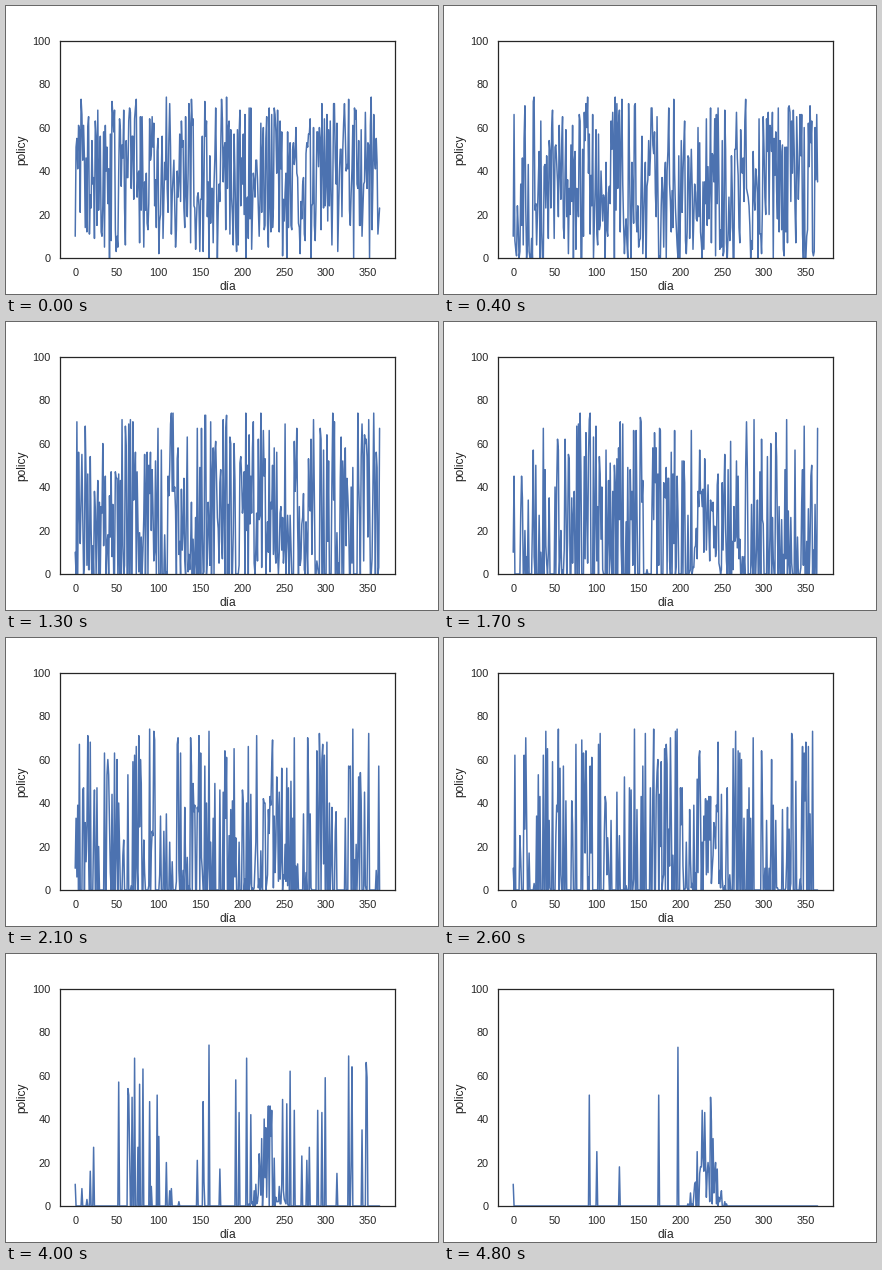
These frames come from a looping animation (432x288 px, 4.9 s). A matplotlib script:

```python
import numpy as np
import matplotlib.pyplot as plt
from matplotlib.animation import FuncAnimation

FRAMES, INTERVAL = 49, 100
DAYS = np.arange(365)
INK = "0.15"
MAX_ACTION = 75
EPS_MIN = 0.022

plt.rcParams.update({
    "font.family": "Liberation Sans",
    "text.kerning_factor": 6,
    "axes.labelcolor": INK,
    "axes.edgecolor": INK,
    "axes.linewidth": 1.25,
    "axes.labelsize": 12,
    "xtick.labelsize": 11,
    "ytick.labelsize": 11,
    "xtick.color": INK,
    "ytick.color": INK,
    "lines.solid_capstyle": "round",
})


def exploration(i):
    """Share of random choices, fading from every day to almost none."""
    return EPS_MIN + (1 - EPS_MIN) * (1 - i / (FRAMES - 1)) ** 1.3


def policy(i):
    """Epsilon-greedy choice per day; the learned part is one short season."""
    rng = np.random.default_rng(700 + i)
    season = 55 * np.exp(-((DAYS - 231) / 13) ** 2)
    learned = (season * rng.random(DAYS.size) ** 1.5).astype(int)
    explored = rng.integers(0, MAX_ACTION, DAYS.size)
    explores = rng.random(DAYS.size) < exploration(i)
    y = np.where(explores, explored, learned)
    y[0] = 10
    return y


fig, ax = plt.subplots(figsize=(6, 4), dpi=72)
fig.subplots_adjust(left=0.125, right=0.9, bottom=0.125, top=0.88)
line, = ax.plot(DAYS, policy(0), color="#4c72b0", lw=1.5)
ax.set_ylim(0, 100)
ax.set_xlabel("día")
ax.set_ylabel("policy")
ax.tick_params(length=6, pad=3.5, bottom=False, left=False)


def update(i):
    line.set_ydata(policy(i))
    return line,


anim = FuncAnimation(fig, update, frames=FRAMES, interval=INTERVAL,
                     repeat=True, repeat_delay=0)
plt.show()
```
